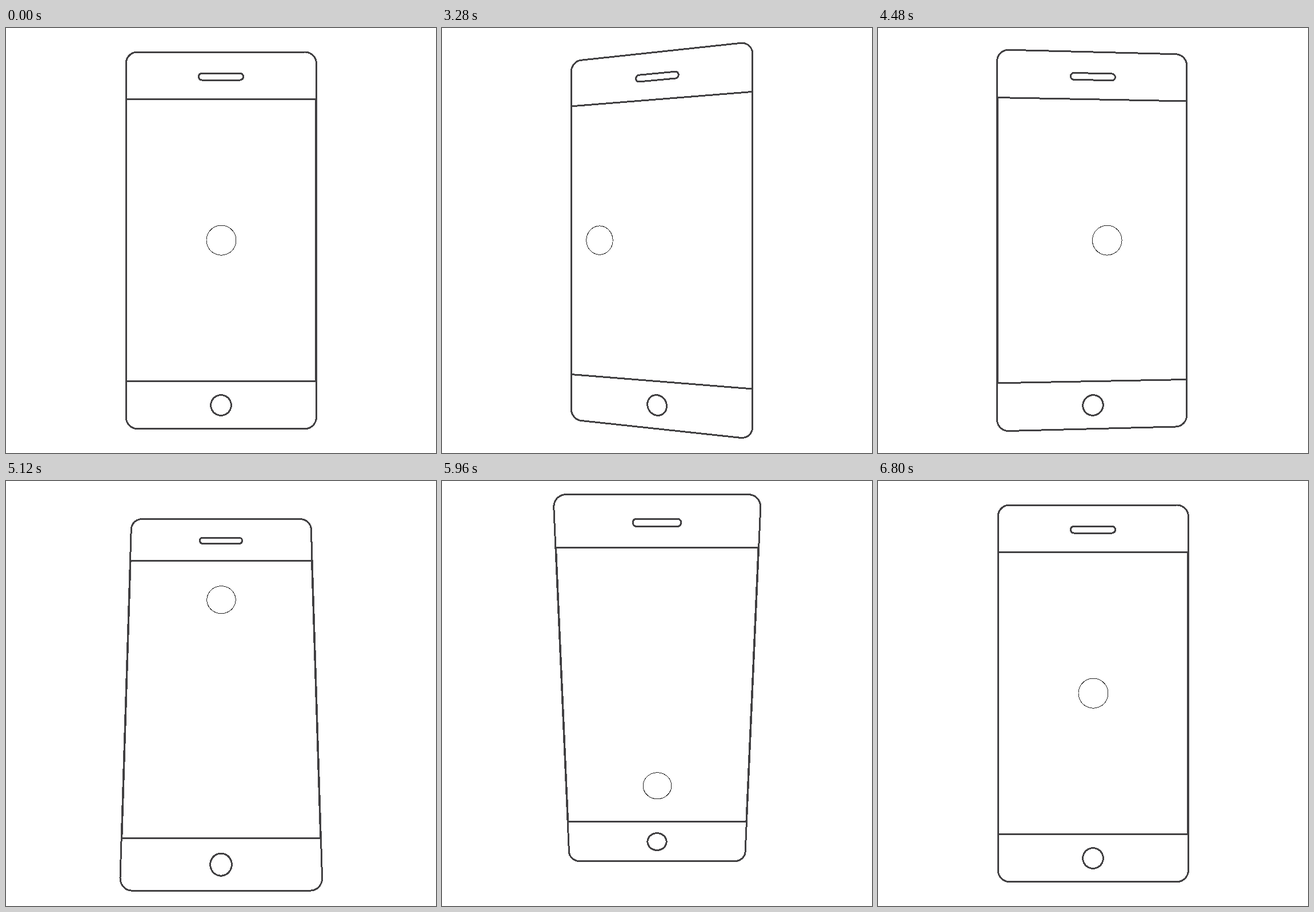
Animation of 753x743 px, one loop 7.8 s. Source, as an HTML page:

```html
<!DOCTYPE html>
<html lang="en">
<head>
<meta charset="utf-8">
<title>Tilting phone</title>
<style>
  html, body { margin: 0; width: 100%; height: 100%; overflow: hidden; background: #fff; }
  svg { display: block; width: 753px; height: 743px; }
  path { fill: none; stroke: #414042; stroke-width: 3; stroke-linejoin: round; shape-rendering: crispEdges; }
  #ball { stroke: #222; stroke-width: 1; }
</style>
</head>
<body>
<svg viewBox="0 0 753 743">
  <path id="body"/>
  <path id="screen"/>
  <path id="speaker"/>
  <path id="home"/>
  <path id="ball"/>
</svg>
<script>
const LOOP = 7800, START = 2800, HALF = 2000, STEP = 40;
const CX = 376.75, CY = 371.3, DEPTH = 1000;

// Outlines are point lists relative to the centre of the phone.
function roundRect(x0, y0, x1, y1, r) {
  const corners = [[x1 - r, y0 + r], [x1 - r, y1 - r], [x0 + r, y1 - r], [x0 + r, y0 + r]];
  const n = r ? 12 : 0, pts = [];
  corners.forEach(([x, y], i) => {
    for (let k = 0; k <= n; k++) {
      const a = (i - 1 + (n ? k / n : 0)) * Math.PI / 2;
      pts.push([x + r * Math.cos(a) - CX, y + r * Math.sin(a) - CY]);
    }
  });
  return pts;
}

function circle(x, y, r) {
  return Array.from({ length: 72 }, (_, i) => {
    const a = i * Math.PI / 36;
    return [x + r * Math.cos(a), y + r * Math.sin(a)];
  });
}

const parts = {
  body: roundRect(210.2, 42, 543.4, 700.7, 20),
  screen: roundRect(210.8, 124.8, 542.8, 617.6, 0),
  speaker: roundRect(337.3, 79.2, 415.6, 91, 5.9),
  home: circle(376.5 - CX, 659.5 - CY, 17.8)
};

// cubic-bezier(.25, .1, .25, 1)
function ease(x) {
  if (x <= 0) return 0;
  if (x >= 1) return 1;
  let lo = 0, hi = 1, s = 0.5;
  for (let i = 0; i < 24; i++) {
    s = (lo + hi) / 2;
    if (0.75 * s - 0.75 * s * s + s * s * s < x) lo = s; else hi = s;
  }
  const q = 1 - s;
  return 0.3 * s * q * q + 3 * q * s * s + s * s * s;
}

const ramp = (t, from, length) => ease((t - from) / length);

// One swing: to -1, over to +1, back to 0.
const tiltAt = t => -ramp(t, -20, 800) + 2 * ramp(t, 780, 412) - ramp(t, 1375, 640);
const rollAt = t => -ramp(t, -20, 412) + 2 * ramp(t, 770, 360) - ramp(t, 1375, 640);

function project([x, y], ax, ay) {
  const s = 1 / (1 + (x * Math.sin(ay) + y * Math.sin(ax)) / DEPTH);
  return (CX + x * Math.cos(ay) * s).toFixed(2) + " " + (CY + y * Math.cos(ax) * s).toFixed(2);
}

function draw(id, pts, ax, ay) {
  const d = "M" + pts.map(p => project(p, ax, ay)).join("L") + "Z";
  document.getElementById(id).setAttribute("d", d);
}

function render(ms) {
  const t = Math.floor(ms % LOOP / STEP) * STEP - START;
  let ax = 0, ay = 0, bx = 0, by = 0;
  if (t >= 0 && t < HALF) {
    ay = tiltAt(t) * 20 * Math.PI / 180;
    bx = rollAt(t) * 110;
  } else if (t >= HALF && t < 2 * HALF) {
    ax = tiltAt(t - HALF) * 15 * Math.PI / 180;
    by = rollAt(t - HALF) * 175;
  }
  for (const id in parts) draw(id, parts[id], ax, ay);
  draw("ball", circle(bx + 0.25, by - 0.2, 26), ax, ay);
}

let begin = null;
function tick(now) {
  if (begin === null) begin = now;
  render(now - begin);
  requestAnimationFrame(tick);
}
render(0);
requestAnimationFrame(tick);
</script>
</body>
</html>
```
